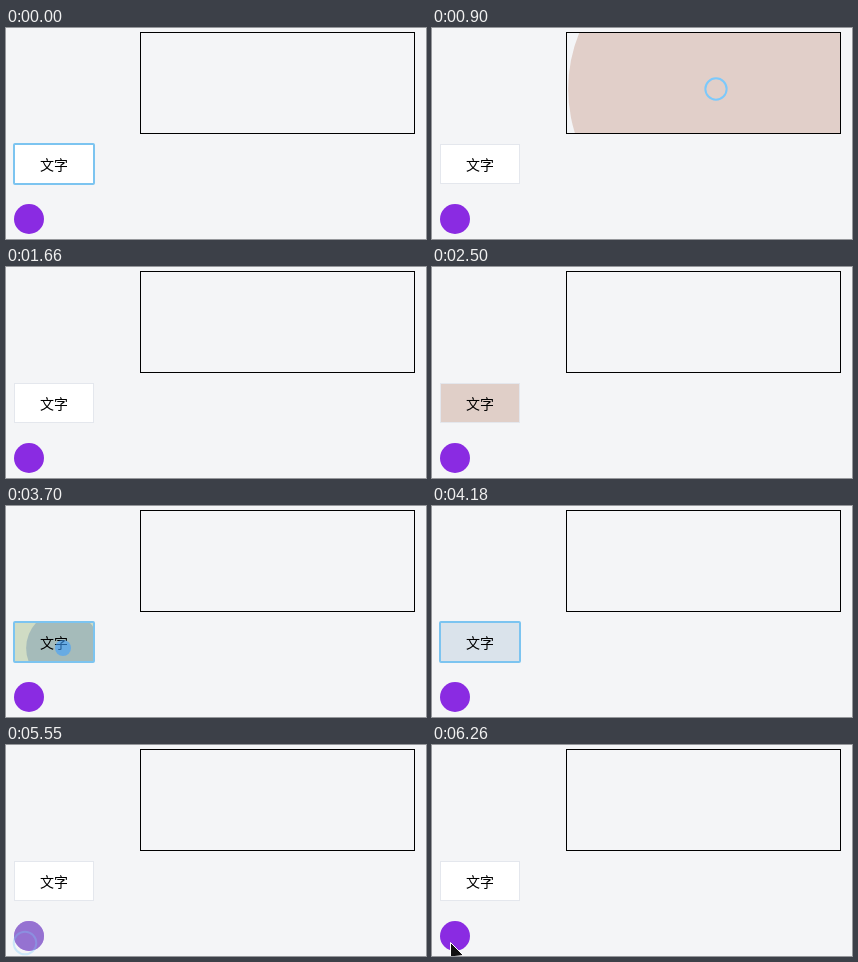
An HTML page that plays this animation: 420x211 px, repeating every 6300 ms.

```html
<!DOCTYPE html>
<html lang="zh">
<head>
<meta charset="utf-8">
<title>Ripple</title>
<style>
html, body { margin: 0; width: 100%; height: 100%; overflow: hidden; background: #f4f5f7; }
svg { display: block; width: 100%; height: 100%; }
text { font: 14px "Noto Sans CJK SC", "Noto Sans CJK", sans-serif; }
</style>
</head>
<body>
<svg viewBox="0 0 420 211">
  <defs>
    <clipPath id="boxClip"><rect x="135" y="5" width="273" height="100"/></clipPath>
    <clipPath id="btnClip"><rect x="9" y="117" width="78" height="38"/></clipPath>
    <clipPath id="dotClip"><circle cx="23" cy="191" r="15"/></clipPath>
  </defs>
  <rect width="420" height="211" fill="#f4f5f7"/>
  <g id="box" clip-path="url(#boxClip)"/>
  <rect x="134.5" y="4.5" width="274" height="101" fill="none" stroke="#000"/>
  <rect x="8.5" y="116.5" width="79" height="39" fill="#fff" stroke="#e4e7ed"/>
  <g id="btn" clip-path="url(#btnClip)"/>
  <text x="34" y="142">文字</text>
  <rect id="focus" x="8" y="116" width="80" height="40" rx="1" fill="none" stroke="#7cc4f0" stroke-width="2"/>
  <circle cx="23" cy="191" r="15" fill="#8a2be2"/>
  <g id="dot" clip-path="url(#dotClip)"/>
  <g id="marks"/>
  <path id="cursor" d="M18.5 197.5V215L22.5 211.5L31.5 210.5Z" fill="#111" stroke="#fff"/>
</svg>
<script>
const LOOP = 6300, STEP = 40, GROW = 400, LIFE = 1000;
const $ = id => document.getElementById(id);
const clamp = v => Math.max(0, Math.min(1, v));

function addCircle(parent, x, y, fill) {
  const c = document.createElementNS('http://www.w3.org/2000/svg', 'circle');
  c.setAttribute('cx', x);
  c.setAttribute('cy', y);
  c.setAttribute('fill', fill);
  return $(parent).appendChild(c);
}

function set(el, attrs) {
  for (const k in attrs) el.setAttribute(k, attrs[k]);
}

// cubic-bezier(.25, .1, .25, 1)
function ease(p) {
  if (p <= 0 || p >= 1) return clamp(p);
  let lo = 0, hi = 1, s = 0.5;
  for (let i = 0; i < 20; i++) {
    s = (lo + hi) / 2;
    const x = 0.75 * s * (1 - s) + s ** 3;
    if (x < p) lo = s; else hi = s;
  }
  return 0.3 * s * (1 - s) ** 2 + 3 * s * s * (1 - s) + s ** 3;
}

// A hold keeps the ripple filled until that age; without a click there is no marker.
const ripples = [
  { host: 'box', start: 660, x: 284, y: 61, r: 167, fill: '#c29682', click: true },
  { host: 'btn', start: 2060, x: 80, y: 118, r: 84, fill: '#b18775', hold: 1080, fade: 400 },
  { host: 'btn', start: 3140, x: 57, y: 142, r: 54, fill: '#5f8736', click: true },
  { host: 'btn', start: 3540, x: 57, y: 142, r: 54, fill: '#6489ab', click: true },
  { host: 'dot', start: 4870, x: 19, y: 198, r: 36, fill: '#d0c4b4', click: true },
  { host: 'dot', start: 5110, x: 19, y: 198, r: 36, fill: '#8fb0c4', click: true }
];
for (const p of ripples) {
  p.wave = addCircle(p.host, p.x, p.y, p.fill);
  if (p.click) p.mark = addCircle('marks', p.x, p.y, 'none');
}

function drawRipple(p, t) {
  const age = Math.floor((t - p.start) / STEP) * STEP;
  const { hold = GROW, fade = LIFE - GROW } = p;
  set(p.wave, {
    r: p.r * ease(age / GROW),
    opacity: age < 0 ? 0 : 0.4 * clamp(1 - (age - hold) / fade)
  });
  if (p.mark) drawMark(p.mark, age);
}

// Pressed disc first, then a ring that widens and fades.
function drawMark(mark, age) {
  const pressed = age < 200;
  set(mark, {
    r: pressed ? 8 * clamp(age / 120) : 10.5 + clamp((age - 200) / 300),
    fill: pressed ? '#40a0ff' : 'none',
    stroke: pressed ? 'none' : '#7cc9fb',
    'stroke-width': 2,
    opacity: age <= 0 ? 0 : pressed ? 0.6 : clamp((540 - age) / 300)
  });
}

function draw(t) {
  for (const p of ripples) drawRipple(p, t);
  const focused = t < 660 || (t >= 3140 && t < 4870);
  set($('focus'), { visibility: focused ? 'visible' : 'hidden' });
  set($('cursor'), { visibility: t >= 6260 ? 'visible' : 'hidden' });
}

const origin = performance.now();
function tick() {
  draw((performance.now() - origin) % LOOP);
  requestAnimationFrame(tick);
}
tick();
</script>
</body>
</html>
```
